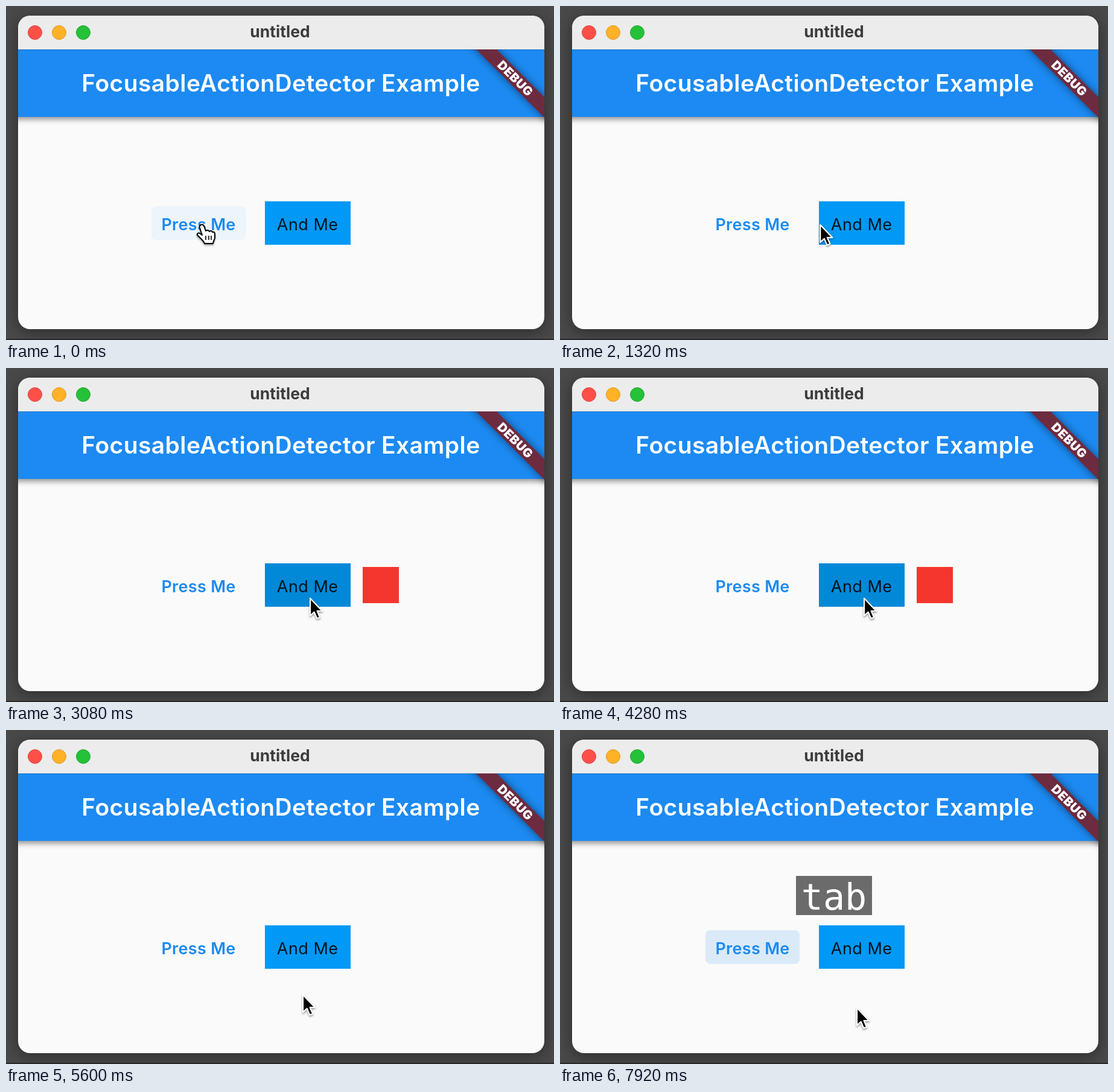
Recreate the animation shown at these times as an HTML page. Size 908x554 px, loop 8000 ms.

```html
<!DOCTYPE html>
<html lang="en">
<head>
<meta charset="utf-8">
<title>Focus and hover demo</title>
<style>
  html, body { margin: 0; width: 100%; height: 100%; overflow: hidden; background: #494949; }
  svg { display: block; width: 908px; height: 554px; font-family: Inter, sans-serif; }
  .window { filter: drop-shadow(0 5px 12px rgba(0, 0, 0, .4)); }
  .bar { filter: drop-shadow(0 4px 5px rgba(0, 0, 0, .42)); }
  .ribbon { filter: drop-shadow(0 0 7px rgba(0, 0, 0, .5)); }
  .pointer { filter: drop-shadow(0 2px 1.5px rgba(0, 0, 0, .4)); stroke-linejoin: round; }
  .mid { text-anchor: middle; }
</style>
</head>
<body>
<svg viewBox="0 0 908 554">
  <defs>
    <clipPath id="frame"><rect x="20" y="16" width="872" height="520" rx="20"/></clipPath>
    <clipPath id="content"><rect x="20" y="72" width="872" height="464"/></clipPath>
  </defs>

  <rect width="908" height="554" fill="#494949"/>
  <rect y="552" width="908" height="2" fill="#2b2b2b"/>
  <rect class="window" x="20" y="16" width="872" height="520" rx="20" fill="#fafafa"/>

  <g clip-path="url(#frame)">
    <g clip-path="url(#content)">
      <rect class="bar" x="10" y="60" width="892" height="124" fill="#1c8af2"/>
    </g>
    <rect x="20" y="16" width="872" height="56" fill="#ececec"/>
    <rect x="20" y="72" width="872" height="1" fill="#1a70c6"/>
    <g stroke-width="1">
      <circle cx="48" cy="44" r="11.5" fill="#fe5049" stroke="#e0433d"/>
      <circle cx="88" cy="44" r="11.5" fill="#ffb128" stroke="#de9a22"/>
      <circle cx="128" cy="44" r="11.5" fill="#25c138" stroke="#1fa62f"/>
    </g>
    <text class="mid" x="454" y="52" font-size="26.5" font-weight="700" fill="#3c3c3c">untitled</text>
    <text class="mid" x="455.5" y="142" font-size="39" font-weight="600" letter-spacing=".4" fill="#fff">FocusableActionDetector Example</text>

    <g clip-path="url(#content)">
      <!-- Band between 56 and 80 px from the corner, turned by 45 degrees -->
      <g transform="translate(892 72) rotate(45)">
        <rect class="ribbon" x="-100" y="56" width="200" height="24" fill="#6d2b40"/>
        <text class="mid" y="75.4" font-size="20.4" font-weight="900" letter-spacing=".5" fill="#fff">DEBUG</text>
      </g>
    </g>
  </g>

  <rect id="tint" x="241" y="332" width="156" height="56" rx="8" fill="#1c8af2"/>
  <text class="mid" x="319" y="372" font-size="27" font-weight="600" letter-spacing=".3" fill="#1c8af2">Press Me</text>
  <rect id="button" x="429" y="324" width="142" height="72"/>
  <text class="mid" x="499.7" y="372" font-size="27" letter-spacing=".5" fill="#000" fill-opacity=".87">And Me</text>
  <rect id="square" x="591" y="330" width="60" height="60" fill="#f4362e"/>

  <g id="key">
    <rect x="391" y="242" width="126" height="65" fill="#6b6b6b"/>
    <text class="mid" x="454" y="298" font-size="60" fill="#fff" style="font-family:'DejaVu Sans Mono',monospace">tab</text>
  </g>

  <g id="hand" class="pointer">
    <path d="M-2 -1C0 -2 2 -1 3 1L6 9C8 7 11 8 12 10C14 8 16 9 17 11C20 10 21 12 21 15V20C21 24 18 26 18 30H4C3 26 -2 22 -8 16C-9 13 -6 12 -4 13L0 16L-4 4C-5 2 -4 0 -2 -1Z" fill="#fff" stroke="#000" stroke-width="2"/>
    <path d="M6 17V24M11 17V24M15 17V24" fill="none" stroke="#000" stroke-width="1.6"/>
  </g>
  <path id="arrow" class="pointer" d="M1 2V31L7.6 24.8L12.3 35.6L17.2 33.5L12.6 23H21Z" fill="#000" stroke="#fff" stroke-width="2.2"/>
</svg>

<script>
const LOOP = 8000;
const $ = id => document.getElementById(id);
const show = (id, on) => $(id).setAttribute("visibility", on ? "visible" : "hidden");
const ramp = (t, start, length) => Math.min(1, Math.max(0, (t - start) / length));

// Pointer stops: time, x, y
const path = [
  [920, 325, 364], [1120, 345, 364], [1200, 380, 362], [1320, 430, 361],
  [1600, 495, 377], [1680, 503, 380], [5480, 503, 380], [5560, 493, 402],
  [5600, 491, 437], [5680, 491, 451], [5840, 491, 459]
];

function pointerAt(t) {
  const i = path.findIndex(p => p[0] > t);
  if (i === 0) return path[0].slice(1);
  if (i < 0) return path.at(-1).slice(1);
  const [a, b] = [path[i - 1], path[i]];
  const k = ramp(t, a[0], b[0] - a[0]);
  return [1, 2].map(n => a[n] + (b[n] - a[n]) * k);
}

function draw(now) {
  const t = now % LOOP;
  const [x, y] = pointerAt(t);
  const overText = t < 1240;
  for (const id of ["hand", "arrow"]) $(id).setAttribute("transform", `translate(${x} ${y})`);
  show("hand", overText);
  show("arrow", !overText);

  const hover = .055 * (1 - ramp(t, 1240, 50));
  const focus = .145 * ramp(t, 7320, 200);
  $("tint").setAttribute("opacity", hover + focus);
  $("button").setAttribute("fill", t >= 1360 && t < 5560 ? "#0189d8" : "#0199f5");
  show("square", t >= 2560 && t < 4360);
  show("key", t >= 7320);
}

function tick() {
  draw(performance.now());
  requestAnimationFrame(tick);
}
tick();
</script>
</body>
</html>
```
